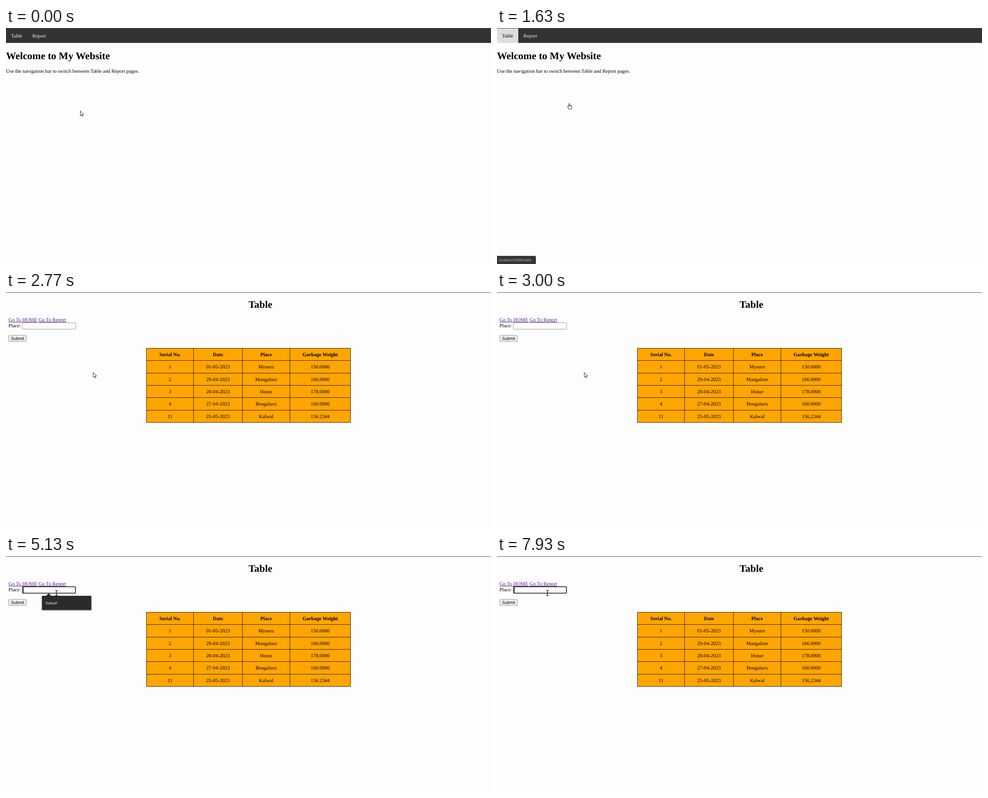
These frames come from a looping animation (1072x522 px, 8 s). An HTML page:

```html
<!DOCTYPE html>
<html lang="en">
<head>
<meta charset="utf-8">
<title>Table page</title>
<style>
  html, body { margin: 0; width: 100%; height: 100%; overflow: hidden; background: #fdfdfd; }
  svg { display: block; width: 1072px; height: 522px; }
  text { font: 11.17px "Liberation Serif", "Times New Roman", serif; text-rendering: geometricPrecision; }
  .h1 { font-size: 22.33px; font-weight: bold; }
  .link { fill: #551a8b; text-decoration: underline; }
  .mid { text-anchor: middle; }
  .bold { font-weight: bold; }
  .ui { font: 9.3px "Liberation Sans", Arial, sans-serif; }
  .chrome { font: 8.5px "Open Sans", "Noto Sans", sans-serif; }
</style>
</head>
<body>
<svg viewBox="0 0 1072 522">
  <rect width="1072" height="522" fill="#fdfdfd"/>

  <g id="home">
    <rect width="1072" height="33" fill="#333"/>
    <rect id="hover" y="1" width="47" height="32" fill="#ddd"/>
    <text id="tab" x="11.2" y="20.6">Table</text>
    <text x="58.2" y="20.6" fill="#f2f2f2">Report</text>
    <text class="h1" x="0" y="68.6">Welcome to My Website</text>
    <text x="0" y="99.4">Use the navigation bar to switch between Table and Report pages.</text>
  </g>

  <g id="table">
    <text class="h1" x="536" y="35.4">Table</text>
    <text class="link" x="5.6" y="65">Go To HOME</text>
    <text class="link" x="71.9" y="65">Go To Report</text>
    <text x="5.6" y="78">Place:</text>
    <rect id="field" x="36" y="68" width="118" height="14.2" rx="1.4" fill="#fff"/>
    <text id="value" class="ui" x="38.4" y="78.2"></text>
    <rect id="caret" y="69" width="1" height="12"/>
    <rect x="6" y="95.9" width="39" height="13.4" rx="2" fill="#efefef" stroke="#767676" stroke-width=".8"/>
    <text class="ui mid" x="25.5" y="105.6">Submit</text>
    <g id="grid"></g>
    <g id="popup">
      <rect x="78.5" y="88.5" width="111.5" height="33.5" rx="2" fill="#000" opacity=".1"/>
      <rect x="78.8" y="88" width="110.6" height="32.4" rx="1.5" fill="#000" opacity=".2"/>
      <path d="M88 88.5L94.3 82.6L100.500 88.500Z" fill="#292b2c"/>
      <rect x="79.500" y="88" width="109" height="31.500" rx="1" fill="#292b2c"/>
      <text class="chrome" x="87.500" y="107" fill="#f4f4f4">Kalwal</text>
    </g>
  </g>

  <rect width="1072" height="1" fill="#4a4a4a"/>

  <g id="status">
    <path d="M0 504H83Q86 504 86 507V522H0Z" fill="#35363a"/>
    <text class="chrome" x="4" y="516" fill="#bdc1c6" style="font-size:7.6px">localhost:3000/table</text>
  </g>

  <g id="pointer">
    <path id="arrow" d="M.4 .5V11.3L2.900 9L4.600 12.500L6.200 11.800L4.600 8.300H7.800Z"
      fill="#fff" stroke="#111" stroke-width=".9" stroke-linejoin="round"/>
    <path id="hand" d="M-1.300 1.300Q-1.300 .3 -.4 .3Q.6 .3 .6 1.300V4.300Q1.500 3.800 2.300 4.700Q3.200 4.300 3.900 5.200Q5.500 4.800 5.500 6.500V9Q5.400 10.500 4.500 11.300V12.800H-1.700V11.600L-4.300 8.200Q-5 7 -4 6.700Q-3.200 6.500 -1.300 8.300Z M.6 4.300V6.500M2.300 4.700V6.600M3.900 5.200V6.800"
      fill="#fff" stroke="#111" stroke-width=".9" stroke-linejoin="round"/>
    <path id="beam" d="M-2.800 -5.700H-.7L0 -5L.7 -5.700H2.800M0 -5V5M-2.800 5.700H-.7L0 5L.7 5.700H2.800"
      fill="none" stroke="#111" stroke-width="1.300"/>
  </g>
</svg>

<script>
const LOOP = 8000;
const $ = id => document.getElementById(id);
const show = (id, on) => $(id).style.display = on ? "" : "none";
const set = (id, attrs) => {
  for (const key in attrs) $(id).setAttribute(key, attrs[key]);
};
const ramp = (t, from, to) => Math.min(1, Math.max(0, (t - from) / (to - from)));
const ease = u => u * u * (3 - 2 * u);

function buildGrid() {
  const cols = [310, 414, 522, 627, 761];
  const rows = [
    ["Serial No.", "Date", "Place", "Garbage Weight"],
    ["1", "01-05-2023", "Mysuru", "150.0000"],
    ["2", "29-04-2023", "Mangalore", "166.0000"],
    ["3", "28-04-2023", "Hosur", "178.0000"],
    ["4", "27-04-2023", "Bengaluru", "160.0000"],
    ["11", "25-05-2023", "Kalwal", "156.2344"]
  ];
  const top = i => Math.round(124 + 27.3 * i);
  let lines = "", cells = "";
  rows.forEach((row, r) => {
    row.forEach((label, c) => {
      const x = (cols[c] + cols[c + 1] + 1) / 2;
      const y = 124.5 + 27.33 * (r + 0.5) + 3.7;
      cells += `<text class="mid${r ? "" : " bold"}" x="${x}" y="${y}">${label}</text>`;
    });
  });
  for (let i = 0; i <= rows.length; i++) lines += `M310 ${top(i) + 0.5}H762`;
  for (const x of cols) lines += `M${x + 0.5} 124V${top(rows.length) + 1}`;
  $("grid").innerHTML =
    `<rect x="310" y="124" width="452" height="164.500" fill="#ffa500"/>` +
    `<path d="${lines}" stroke="#1c1400" stroke-width=".9"/>` + cells;
}

// Pointer stops: time, x, y; moves between stops are eased.
const stops = [
  [30, 164, 183], [670, 13.3, 30], [1230, 13.3, 30], [1700, 169, 175],
  [1929, 169, 175], [1930, 192.500, 177.500], [4130, 192.500, 177.500],
  [4330, 218, 168], [4900, 111.500, 82]
];

function pointerAt(t) {
  let a = stops[0];
  for (const b of stops) {
    if (t < b[0]) {
      const u = ease(ramp(t, a[0], b[0]));
      return [a[1] + (b[1] - a[1]) * u, a[2] + (b[2] - a[2]) * u];
    }
    a = b;
  }
  return [a[1], a[2]];
}

function draw(t) {
  const onTable = t >= 2770;
  const [x, y] = pointerAt(t);
  const hover = t < 1930 && (t >= 1230 || (y < 33 && x < 47));
  const focus = t >= 4930;
  const typed = t >= 6870 && t < 7270;
  const blinkOff = (t >= 5570 && t < 6070) || (t >= 6630 && t < 6870) || (t >= 7430 && t < 7930);

  show("home", !onTable);
  show("table", onTable);
  show("hover", hover);
  set("tab", { fill: hover ? "#000" : "#f2f2f2" });

  set("field", focus
    ? { stroke: "#101010", "stroke-width": 1.6, x: 36.5, width: 117 }
    : { stroke: "#767676", "stroke-width": 0.8, x: 36, width: 118 });
  $("value").textContent = typed ? "D" : "";
  show("caret", focus && !blinkOff);
  set("caret", { x: typed ? 44.3 : 38 });
  set("popup", { opacity: ramp(t, 4960, 5130) * (1 - 0.07 * ramp(t, 6840, 6870) - 0.93 * ramp(t, 6870, 7030)) });
  set("status", { opacity: ramp(t, 760, 930) * (1 - ramp(t, 2170, 2430)) });

  const beam = onTable && x > 36 && x < 154 && y > 67 && y < 82.6;
  show("hand", hover);
  show("beam", beam);
  show("arrow", !hover && !beam);
  set("pointer", { transform: `translate(${x} ${y})` });
}

buildGrid();
const start = performance.now();
function tick() {
  draw((performance.now() - start) % LOOP);
  requestAnimationFrame(tick);
}
tick();
</script>
</body>
</html>
```
